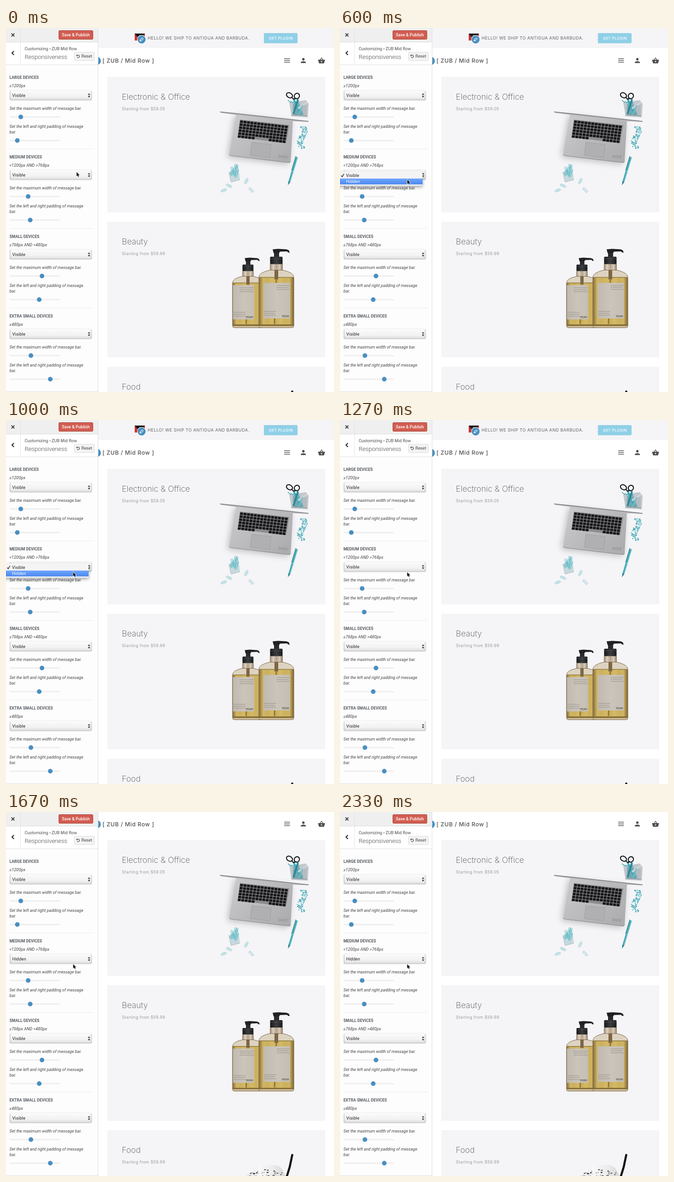
Animation, 711 px wide and 787 px high, one loop 2.39 s. Source, as an HTML page with a canvas:

```html
<!DOCTYPE html>
<html lang="en">
<head>
<meta charset="utf-8">
<title>Responsiveness settings</title>
<style>
html, body { margin: 0; width: 100%; height: 100%; overflow: hidden; background: #fff; }
canvas { display: block; }
</style>
</head>
<body>
<canvas id="stage" width="711" height="787"></canvas>
<script>
const ctx = document.getElementById('stage').getContext('2d');
const LOOP = 2390, OPEN = 200, CLOSE = 1130, CLOSED = 1230, HIDE = 1330;
const BAR = 44.5, CARD_STEP = 313.5, SECTION_STEP = 172;
const UI = 'Roboto, sans-serif', SITE = 'Inter, sans-serif';
const BLUE = '#488fc0', PANEL = '#f5f4f6', TEAL = '#3fa9b7';

const sections = [
  ['LARGE DEVICES', '≥1200px', 32, 24.5],
  ['MEDIUM DEVICES', '<1200px AND >768px', 48, 52.5],
  ['SMALL DEVICES', '≤768px AND >480px', 78, 72],
  ['EXTRA SMALL DEVICES', '≤480px', 54, 96]
];
const cards = [['Electronic & Office', '$59.05'], ['Beauty', '$59.99'], ['Food', '$59.99']];

function text(s, x, y, font, color, spacing = 0) {
  ctx.font = font;
  ctx.letterSpacing = spacing + 'px';
  ctx.fillStyle = color;
  ctx.fillText(s, x, y);
}
function rect(x, y, w, h, fill, r = 0, stroke) {
  ctx.beginPath();
  ctx.roundRect(x, y, w, h, r);
  ctx.fillStyle = fill;
  ctx.fill();
  if (stroke) { ctx.strokeStyle = stroke; ctx.lineWidth = 1; ctx.stroke(); }
}
function trace(points) {
  ctx.beginPath();
  for (let i = 0; i < points.length; i += 2) ctx.lineTo(points[i], points[i + 1]);
}
function poly(points, fill) {
  trace(points);
  ctx.closePath();
  ctx.fillStyle = fill;
  ctx.fill();
}
function line(points, color, width = 1) {
  trace(points);
  ctx.strokeStyle = color;
  ctx.lineWidth = width;
  ctx.stroke();
}
function dot(x, y, r, fill) {
  ctx.beginPath();
  ctx.arc(x, y, r, 0, 7);
  ctx.fillStyle = fill;
  ctx.fill();
}
function ring(x, y, rx, ry, angle, color, width) {
  ctx.beginPath();
  ctx.ellipse(x, y, rx, ry, angle, 0, 7);
  ctx.strokeStyle = color;
  ctx.lineWidth = width;
  ctx.stroke();
}
function gradient(x0, y0, x1, y1, ...colors) {
  const g = ctx.createLinearGradient(x0, y0, x1, y1);
  colors.forEach((c, i) => g.addColorStop(i / (colors.length - 1), c));
  return g;
}
function at(x, y, draw, angle = 0, scale = 1) {
  ctx.save();
  ctx.translate(x, y);
  ctx.rotate(angle);
  ctx.scale(scale, scale);
  draw();
  ctx.restore();
}
function shaded(color, blur, dx, dy, draw) {
  ctx.save();
  ctx.shadowColor = color;
  ctx.shadowBlur = blur;
  ctx.shadowOffsetX = dx;
  ctx.shadowOffsetY = dy;
  draw();
  ctx.restore();
}
function seeded(seed) {
  return () => (seed = seed * 16807 % 2147483647) / 2147483647;
}
const mix = (a, b, p) => a + (b - a) * p;
const ease = (t, a, b) => {
  const p = Math.min(1, Math.max(0, (t - a) / (b - a)));
  return p * p * (3 - 2 * p);
};

const personIcon = new Path2D('M12 12c2.21 0 4-1.79 4-4s-1.79-4-4-4-4 1.79-4 4 1.79 4 4 4zm0 2c-2.67 0-8 1.34-8 4v2h16v-2c0-2.66-5.33-4-8-4z');
const basketIcon = new Path2D('M17.2 9l-4.4-6.6a1 1 0 0 0-1.6 0L6.8 9H2a1 1 0 0 0-1 1.3l2.6 9.2A2 2 0 0 0 5.5 21h13a2 2 0 0 0 1.9-1.5L23 10a1 1 0 0 0-1-1zM9 9l3-4.4L15 9zm3 8a2 2 0 1 1 0-4 2 2 0 0 1 0 4z');
const arrowIcon = new Path2D('M0 0V11.2L2.6 8.8 4.4 12.8 6.3 12 4.6 8.1H8Z');

/* Sidebar */

function slider(x, y) {
  rect(8, y - 1.5, 109, 3, '#eeeeef', 1.5);
  dot(x, y, 5, BLUE);
}

function select(y, value) {
  shaded('rgba(0,0,0,.4)', 2, 0, .5, () =>
    rect(8.5, y, 177, 20.5, gradient(0, y, 0, y + 20.5, '#fbfbfb', '#f6f6f6', '#f2f2f2', '#dcdcdc'), 2));
  rect(8.5, y + 1, 2.5, 19, 'rgba(0,0,0,.07)');
  rect(183, y + 1, 2.5, 19, 'rgba(0,0,0,.07)');
  text(value, 13.5, y + 14, '9.33px ' + UI, '#222', .1);
  poly([177.5, y + 9.6, 180, y + 6, 182.5, y + 9.6], '#333');
  poly([177.5, y + 11.8, 180, y + 15.4, 182.5, y + 11.8], '#333');
}

function section([title, range, width, padding], i, value) {
  const italic = 'italic 9px ' + UI;
  ctx.save();
  ctx.translate(0, i * SECTION_STEP);
  text(title, 7.5, 110.2, '600 8.67px ' + UI, '#575b60');
  text(range, 7.5, 127.6, italic, '#3c3c3c', .15);
  select(135, value);
  text('Set the maximum width of message bar.', 7.5, 177.4, italic, '#444');
  slider(width, 192.3);
  text('Set the left and right padding of message', 7.5, 216, italic, '#444');
  text('bar.', 7.5, 228, italic, '#444');
  slider(padding, 243.2);
  if (i < 3) rect(8, 261, 182, 1, '#ececee');
  ctx.restore();
}

function sidebar(hidden) {
  rect(0, 0, 200, 787, '#fdfdfe');
  rect(0, 0, 199, 30, '#efeff0');
  rect(0, 30, 199, 49, '#fff');
  rect(0, 30, 199, 1, '#dedee0');
  rect(0, 79, 199, 1, '#dedee0');
  rect(31, 0, 1, 79, '#e2e2e4');
  line([11.7, 11.7, 18.3, 18.3], '#333', 1.7);
  line([18.3, 11.7, 11.7, 18.3], '#333', 1.7);
  line([17.2, 50, 13, 54.2, 17.2, 58.4], '#222', 2);
  rect(114.5, 5.5, 74, 19, '#d15d50', 2, '#b1483e');
  text('Save & Publish', 121, 18.2, '500 9.15px ' + UI, '#fff');
  text('Customizing • ZUB Mid Row', 40.5, 48, '9.15px ' + UI, '#484b4f');
  text('Responsiveness', 40.5, 66.6, '300 13.3px ' + UI, '#4c4f53', -.2);
  rect(148.5, 52.5, 43, 18, '#f3f3f4', 2, '#dddde0');
  ctx.beginPath();
  ctx.arc(156.3, 61.3, 2.9, -2.3, 2.5);
  ctx.strokeStyle = '#444';
  ctx.lineWidth = 1.1;
  ctx.stroke();
  poly([152.6, 57.4, 152.8, 61, 156.2, 60.2], '#444');
  text('Reset', 163.5, 64.4, '9.2px ' + UI, '#444');
  sections.forEach((s, i) => section(s, i, hidden && i === 1 ? 'Hidden' : 'Visible'));
  rect(199, 0, 1, 787, '#dcdcde');
  rect(0, 785.5, 199, 1, '#dedee0');
}

/* Product pictures */

function clip(x, y, angle) {
  at(x, y, () => {
    ctx.beginPath();
    ctx.roundRect(-6, -2, 12, 4, 2);
    ctx.strokeStyle = '#5db9c4';
    ctx.lineWidth = .8;
    ctx.stroke();
    line([-4, -.2, 4, -.2], '#8fd2d9', .8);
  }, angle);
}

function laptop() {
  shaded('rgba(60,60,70,.3)', 14, -4, 4, () =>
    poly([499, 186, 622, 200, 617, 288, 614, 291, 487, 276, 484, 273], gradient(500, 190, 600, 290, '#c9c9cb', '#bababc', '#adadb0')));
  line([484, 273.5, 487, 276, 614, 291, 617, 288], '#8b8b8f', 1.2);
  poly([463, 180.5, 500, 184, 656, 201, 655, 203, 620, 201.5, 500, 188, 466, 183.5], '#b8b8bb');
  line([464, 181.3, 656, 202], '#66666b', 1);
  poly([507, 198, 614, 210, 607, 249, 502, 236], '#8b8b8f');
  for (let row = 0; row < 6; row++) {
    for (let key = 0; key < 14; key++) {
      if (row === 5 && key > 4 && key < 9) continue;
      const u = key * 7.45, x = 508 - row, y = 199.7 + row * 6.4;
      poly([x + u, y + u * .115, x + u + 6.2, y + u * .115 + .7, x + u + 5.4, y + u * .115 + 5.9, x + u - .8, y + u * .115 + 5.2], '#151517');
    }
  }
  poly([533, 247, 575, 252, 571.5, 280, 529.5, 275], '#b0b0b2');
  line([533, 247, 575, 252, 571.5, 280, 529.5, 275, 533, 247], '#98989b', .7);
  at(590, 280, () => text('[n/n]', 0, 0, '8px ' + SITE, '#7d7d80', .3), .06);
}

function office() {
  const rnd = seeded(71);
  laptop();
  // scissors in a glass holder
  poly([614, 161, 650, 156, 656, 164, 654, 193, 619, 191], 'rgba(160,170,176,.6)');
  poly([620, 170, 652, 166, 652, 191, 621, 189], 'rgba(178,184,189,.8)');
  poly([622, 164, 634, 158, 645, 188, 624, 188], 'rgba(63,150,163,.55)');
  line([623, 152, 639, 188], TEAL, 4);
  line([633, 154, 623, 186], '#2a8998', 4);
  line([653, 160, 633, 174], '#ccd2d5', 4);
  line([643, 167, 635, 187], '#6bc0ca', 3);
  line([618, 188, 653, 190], '#8b9499', 1);
  ring(614.5, 145.5, 7, 5, .5, '#161c20', 2.2);
  ring(630.5, 147, 6, 5.5, -1, '#161c20', 2.2);
  line([619, 150, 624, 154, 628, 152], '#161c20', 2);
  for (let i = 0; i < 7; i++) dot(612 + i * 2.4, 157 + rnd() * 5, 1.2, TEAL);
  // beads
  for (let i = 0; i < 85; i++) {
    const p = rnd();
    dot(642 + Math.sin(p * 6 + .4) * 5 + (rnd() - .5) * 13, 213 + p * 48, 1.3, ['#3699a8', '#5ab9c5', '#98d5dc'][i % 3]);
  }
  // pen
  line([630.5, 279, 614.5, 332], '#43a9b6', 4.4);
  line([631.8, 281, 616, 332], '#86cdd5', 1.2);
  line([628.3, 277, 619, 308], '#27808d', 1.2);
  poly([612.3, 331, 616.3, 333, 611.2, 340], '#267b86');
  line([621, 309, 626, 310.5], '#d2eef0', 1);
  // jar and loose clips
  poly([483, 311, 504, 306, 507, 328, 488, 333], 'rgba(150,190,197,.5)');
  line([483, 311, 488, 333, 507, 328], '#a2b7bc', 1);
  for (let i = 0; i < 13; i++) clip(488 + rnd() * 14, 299 + rnd() * 26, 1 + rnd() * 1.2);
  clip(472, 351, -.35);
  clip(483.5, 341, .45);
  clip(521, 331, -1.1);
  clip(531.5, 350.5, .8);
}

function specks(x, y, width) {
  for (let row = 0; row < 3; row++)
    for (let u = 0; u < width - row % 2 * 2; u += 2.9) rect(x + u, y + row * 4.2, 1.4, 1.3, '#7a736a');
}

function bottle(cx, half, top, k, label) {
  const bottom = 648, shoulder = top + 58 * k, neck = 14 * k;
  const body = () => {
    ctx.beginPath();
    ctx.moveTo(cx - neck, top + 46 * k);
    ctx.quadraticCurveTo(cx - half, shoulder - 7 * k, cx - half, shoulder + 4);
    ctx.lineTo(cx - half, bottom - 4);
    ctx.quadraticCurveTo(cx - half, bottom, cx - half + 4, bottom);
    ctx.lineTo(cx + half - 4, bottom);
    ctx.quadraticCurveTo(cx + half, bottom, cx + half, bottom - 4);
    ctx.lineTo(cx + half, shoulder + 4);
    ctx.quadraticCurveTo(cx + half, shoulder - 7 * k, cx + neck, top + 46 * k);
    ctx.closePath();
  };
  // neck and glass
  rect(cx - neck, top + 31 * k, neck * 2, 17 * k, gradient(cx - neck, 0, cx + neck, 0, '#94826b', '#ddd2c1', '#b3a28b', '#d9ccb8', '#8a785f'), 2);
  body();
  ctx.fillStyle = '#ddd3c0';
  ctx.fill();
  ctx.save();
  ctx.clip();
  const amber = gradient(cx - half, 0, cx + half, 0, '#846c35', '#d0b566', '#ccb05c', '#d4b966', '#ccb05c', '#d4b966', '#ccb05c', '#cfb463', '#7d6430');
  rect(cx - half, shoulder + 4, half * 2, bottom - shoulder - 10, amber);
  rect(cx - half, shoulder + 3, half * 2, 1.5, '#8f7840');
  rect(cx - half, bottom - 7, half * 2, 3, '#7f6731');
  rect(cx - half, bottom - 4, half * 2, 4, '#cdbb97');
  rect(cx - 4 * k, top + 38 * k, 8 * k, shoulder - top - 30 * k, '#7d6645');
  line([cx, shoulder + 8, cx - 4, bottom - 8], '#92773a', 3);
  ctx.restore();
  body();
  ctx.strokeStyle = '#7b674a';
  ctx.lineWidth = 1;
  ctx.stroke();
  // pump
  at(cx, top, () => {
    rect(-5, 4, 11, 16, '#292a2b');
    poly([-8, 1, 4, 0, 22, 1, 27, 3, 29, 8, 26, 8, 23, 5.5, 8, 6, 6, 9, -6, 9], '#202122');
    rect(-13.5, 17, 27, 16, gradient(-13, 0, 13, 0, '#17181a', '#3c3d3e', '#1b1c1d'), 2);
    rect(-13, 21, 26, 1, '#49494a');
  }, 0, k);
  // label
  const [x, y, w, h, inset] = label;
  rect(x, y, w, h, gradient(x, 0, x + w, 0, '#c0bab0', '#cac4bb', '#c4beb4'));
  specks(x + w - inset - 1, y + 5, inset);
  specks(x + 2, y + h - 16, inset * .85);
  text('VELDO', x + w - 18, y + h - 3.5, 'bold 4.4px "Noto Serif", serif', '#45413c');
}

function food() {
  const rnd = seeded(19);
  ctx.beginPath();
  ctx.moveTo(516, 838);
  ctx.bezierCurveTo(522, 826, 537, 824, 546, 813);
  ctx.bezierCurveTo(553, 806, 560, 807, 570, 808);
  ctx.bezierCurveTo(588, 805, 597, 813, 600, 820);
  ctx.lineTo(609, 838);
  ctx.fillStyle = gradient(520, 0, 606, 0, '#e4e3e3', '#f8f8f8', '#eeeded', '#d8d7d7');
  ctx.fill();
  for (let i = 0; i < 42; i++) {
    const x = 526 + rnd() * 76, y = 815 + Math.abs(x - 565) * .25 + rnd() * 16;
    rect(x, y, 1 + rnd() * 4, 1 + rnd() * 2, i % 3 ? '#3b3b3d' : '#aaa', .6);
  }
  ctx.lineCap = 'round';
  line([620.5, 786, 615, 812, 607, 838], '#111', 4.5);
  ctx.lineCap = 'butt';
}

/* Shop preview */

function badge(x, y) {
  dot(x, y, 9.6, '#fff');
  dot(x, y, 8.6, BLUE);
  at(x, y, () => {
    rect(-3.2, -1.5, 6.6, 3, BLUE, .5, '#fff');
    poly([-3.2, -1.8, -6, 0, -3.2, 1.8], '#fff');
  }, -Math.PI / 4);
}

function messageBar() {
  rect(200, 0, 511, 43.5, PANEL);
  rect(279, 12, 22, 15, '#d3312e');
  poly([279, 12, 301, 12, 290, 27], '#171515');
  poly([283.5, 18.5, 296.5, 18.5, 293.6, 22.5, 286.4, 22.5], '#3579bb');
  poly([286.4, 22.5, 293.6, 22.5, 290, 27], '#fff');
  dot(290, 17.8, 2, '#f2c63b');
  badge(294, 24.8);
  text('HELLO! WE SHIP TO ANTIGUA AND BARBUDA.', 307, 24.8, '9.2px ' + SITE, '#666', .45);
  rect(559, 11, 73, 22, '#8fd0e7', 2);
  text('GET PLUGIN', 570, 25, '500 8px ' + SITE, '#fff', .4);
}

function preview(hidden) {
  ctx.save();
  ctx.beginPath();
  ctx.rect(200, 0, 511, 787);
  ctx.clip();
  if (hidden) ctx.translate(0, -BAR);
  else messageBar();
  badge(197, 71.2);
  text('[ ZUB / Mid Row ]', 209, 75.4, '500 12.3px ' + SITE, '#505050', .6);
  for (let i = 0; i < 3; i++) rect(603, 65.7 + i * 3.8, 12.5, 1.4, '#505050');
  ctx.fillStyle = '#505050';
  at(636.3, 62, () => ctx.fill(personIcon), 0, .69);
  at(675.8, 62.3, () => ctx.fill(basketIcon), 0, .68);
  cards.forEach(([title, price], i) => {
    const y = 105.5 + i * CARD_STEP;
    rect(220, y, 472, 293, PANEL);
    text(title, 251, y + 49, '200 17.6px ' + SITE, '#505050', .05);
    text('Starting from ' + price, 251.3, y + 72, '8.7px ' + SITE, '#999', .43);
  });
  office();
  bottle(524.5, 33.5, 496.5, .88, [492, 556, 46, 74, 30]);
  bottle(586, 38, 477.5, 1, [558.5, 551, 57.5, 77, 28]);
  food();
  ctx.restore();
}

/* Popup and pointer */

function menu(alpha, active) {
  ctx.save();
  ctx.globalAlpha = alpha;
  shaded('rgba(0,0,0,.35)', 7, 0, 3, () => rect(-10, 310, 189, 31, '#f4f4f5', 3));
  const y = 312.5 + active * 13;
  rect(0, y, 179, 12.8, gradient(0, y, 0, y + 13, '#6ea6fa', '#4b87f0'));
  const ink = i => i === active ? '#fff' : '#222';
  line([2.6, 319, 4.8, 321.8, 8.6, 315.4], ink(0), 1.4);
  text('Visible', 13, 322.2, '9.33px ' + UI, ink(0), .1);
  text('Hidden', 13, 335, '9.33px ' + UI, ink(1), .1);
  ctx.restore();
}

function cursor(x, y) {
  at(x, y, () => {
    ctx.strokeStyle = '#fff';
    ctx.lineWidth = 1.6;
    ctx.stroke(arrowIcon);
    ctx.fillStyle = '#111';
    ctx.fill(arrowIcon);
  }, 0, .82);
}

function draw(now) {
  const t = now % LOOP, hidden = t >= HIDE;
  const settle = ease(t, 70, 330), down = ease(t, 400, 590), rest = ease(t, 600, 900);
  const x = 153 - settle - down * 6 - rest * .4;
  const y = mix(311.5, 315.3, settle) + down * 12.7 + rest;
  rect(0, 0, 711, 787, '#fff');
  preview(hidden);
  sidebar(hidden);
  if (t >= OPEN && t < CLOSED) menu(1 - ease(t, CLOSE, CLOSED), y > 323 ? 1 : 0);
  cursor(x, y);
  requestAnimationFrame(() => draw(performance.now()));
}
draw(performance.now());
</script>
</body>
</html>
```
